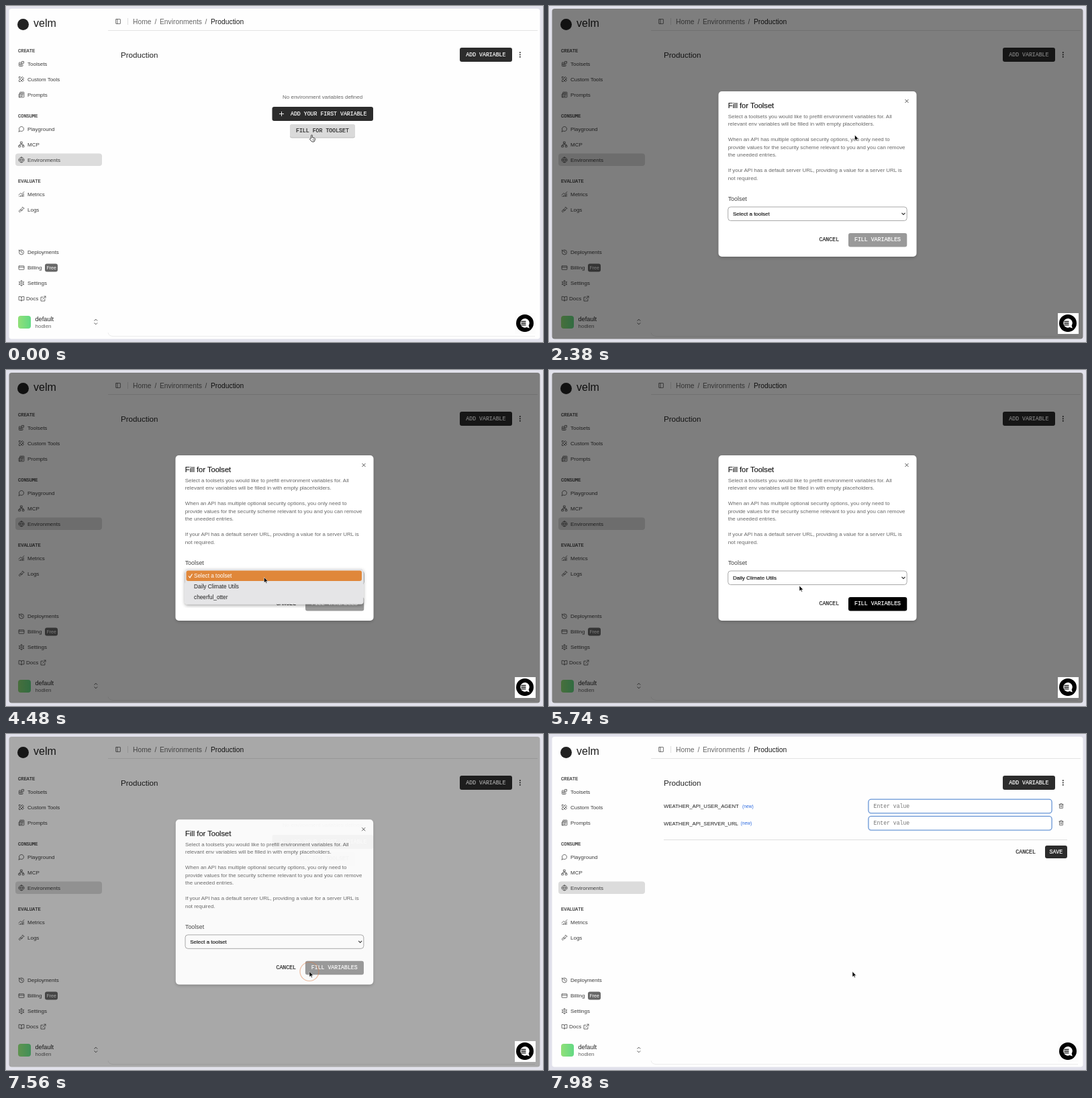
Write an HTML page that moves like this. It is 800 px wide and 500 px high and loops after 8 s.

```html
<!DOCTYPE html>
<html lang="en">
<head>
<meta charset="utf-8">
<title>Fill environment</title>
<style>
html, body { margin: 0; width: 100%; height: 100%; overflow: hidden; background: #e1e1eb; }
svg { display: block; width: 800px; height: 500px; }
text { font-family: "Liberation Sans", Arial, sans-serif; white-space: pre; }
.mono { font-family: "Liberation Mono", monospace; }
.medium { stroke: currentColor; stroke-width: .2px; }
.icon { fill: none; stroke: #484848; stroke-width: 2; stroke-linecap: round; stroke-linejoin: round; }
</style>
</head>
<body>
<svg id="stage" viewBox="0 0 800 500"></svg>
<script>
const ICONS = {
  blocks: 'M14 3h7v7h-7zM10 21V8a1 1 0 0 0-1-1H4a1 1 0 0 0-1 1v12a1 1 0 0 0 1 1h12a1 1 0 0 0 1-1v-5a1 1 0 0 0-1-1H3',
  tools: 'M3 3h5l4 4M15 10l6 6-5 5-6-6M8 13 3 8V3M16 3l5 5L8 21H3v-5z',
  news: 'M4 22h16a2 2 0 0 0 2-2V4a2 2 0 0 0-2-2H8a2 2 0 0 0-2 2v16a2 2 0 0 1-4 0v-9a2 2 0 0 1 2-2h2M18 14h-8M15 18h-5M10 6h8v4h-8z',
  chat: 'M7.9 20A9 9 0 1 0 4 16.1L2 22z',
  network: 'M16 16h6v6h-6zM2 16h6v6H2zM9 2h6v6H9zM5 16v-4h14v4M12 12V8',
  globe: 'M12 2a10 10 0 1 0 .01 0M12 2a14.5 14.5 0 0 0 0 20 14.5 14.5 0 0 0 0-20M2 12h20',
  chart: 'M12 16v5M16 14v7M20 10v11M8 18v3M4 20v1M22 3l-9 9-4-4-7 7',
  tube: 'M21 7 7 21a3 3 0 0 1-4-4L17 3M16 2l6 6M7 14h9',
  history: 'M3 12a9 9 0 1 0 9-9 9.7 9.7 0 0 0-7 2.7L3 8M3 3v5h5M12 7v5l4 2',
  card: 'M3 5h18a1 1 0 0 1 1 1v12a1 1 0 0 1-1 1H3a1 1 0 0 1-1-1V6a1 1 0 0 1 1-1M2 10h20',
  gear: 'M12 9a3 3 0 1 0 .01 0M12 4a8 8 0 1 0 .01 0M12 1v3M12 20v3M2.5 6.5l2.6 1.5M18.9 16l2.6 1.5M2.5 17.5l2.6-1.5M18.9 8l2.6-1.5',
  book: 'M12 7v14M3 18a1 1 0 0 1-1-1V4h5a5 4 0 0 1 5 4 5 4 0 0 1 5-4h5v14h-7a3 3 0 0 0-3 3 3 3 0 0 0-3-3z',
  link: 'M15 3h6v6M10 14 21 3M18 13v8H3V6h8',
  trash: 'M3 6h18M19 6v14a2 2 0 0 1-2 2H7a2 2 0 0 1-2-2V6M8 6V4a2 2 0 0 1 2-2h4a2 2 0 0 1 2 2v2M10 11v6M14 11v6',
  panel: 'M4 3h16a1 1 0 0 1 1 1v16a1 1 0 0 1-1 1H4a1 1 0 0 1-1-1V4a1 1 0 0 1 1-1M9 3v18'
};

// Markup helpers; text is placed by its left edge and baseline.
const text = (x, y, str, size = 8, fill = '#3c3c3c', attrs = '') =>
  `<text x="${x}" y="${y}" font-size="${size}" fill="${fill}" color="${fill}" ${attrs}>${str}</text>`;
const mono = (x, y, str, fill = '#222', size = 8.22, attrs = '') =>
  text(x, y, str, size, fill, `class="mono medium" ${attrs}`);
const rect = (x, y, w, h, fill, r = 0, attrs = '') =>
  `<rect x="${x}" y="${y}" width="${w}" height="${h}" rx="${r}" fill="${fill}" ${attrs}/>`;
const line = (d, color, width = 1, attrs = '') =>
  `<path d="${d}" fill="none" stroke="${color}" stroke-width="${width}" ${attrs}/>`;
const icon = (name, cx, cy, size = 9.4) =>
  `<path class="icon" d="${ICONS[name]}" transform="translate(${cx - size / 2} ${cy - size / 2}) scale(${size / 24})"/>`;
const group = (id, body, attrs = '') => `<g id="${id}" ${attrs}>${body}</g>`;

const navItems = [
  ['blocks', 'Toolsets', 86], ['tools', 'Custom Tools', 109], ['news', 'Prompts', 132],
  ['chat', 'Playground', 183], ['network', 'MCP', 206], ['globe', 'Environments', 229],
  ['chart', 'Metrics', 280], ['tube', 'Logs', 303],
  ['history', 'Deployments', 366.5], ['card', 'Billing', 389.5], ['gear', 'Settings', 412.5]
];

const sidebar =
  '<circle cx="25.5" cy="27.5" r="8.5" fill="#222"/>' +
  text(41, 31, 'velm', 16, '#1c1c1c') +
  [['CREATE', 69], ['CONSUME', 166], ['EVALUATE', 263]]
    .map(([label, y]) => mono(18, y, label, '#333', 7)).join('') +
  rect(14, 219.5, 129, 18.5, '#dcdcdc', 4) +
  navItems.map(([name, label, y]) => icon(name, 23, y) + text(32, y + 2.7, label)).join('') +
  rect(58, 383.5, 19, 12, '#686868', 3) + text(60.5, 392.2, 'Free', 7, '#fff') +
  icon('book', 23, 435.5) + text(30, 438.4, 'Docs') + icon('link', 55.5, 435.5) +
  rect(18, 461, 19, 19, 'url(#avatar)', 4) +
  text(43.5, 469, 'default', 9.2, '#222') + text(43.5, 479, 'hodlen', 8, '#666') +
  line('M131.5 468.5l2.3-2.3 2.3 2.3M131.5 471.5l2.3 2.3 2.3-2.3', '#444', .9);

const header =
  line('M152 36.5H792', '#e4e4e4') + line('M152 486q1 5 7 5.5H788', '#ececec') +
  icon('panel', 167, 23, 9) + line('M181.5 18v10', '#dedede') +
  text(189, 26.6, 'Home', 10.3, '#666') + text(221.5, 26.6, '/', 10.3, '#666') +
  text(229, 26.6, 'Environments', 10.3, '#666') + text(296.5, 26.6, '/', 10.3, '#666') +
  text(305, 26.6, 'Production', 10.3, '#1c1c1c') +
  text(171, 76.8, 'Production', 11.6, '#222') +
  rect(676, 62, 78, 21, '#2c2c2c', 3) + mono(685.3, 75.2, 'ADD VARIABLE', '#fff') +
  [69.3, 72.5, 75.7].map(y => `<circle cx="765.8" cy="${y}" r=".95" fill="#222"/>`).join('');

const emptyState =
  text(412, 138, 'No environment variables defined', 8, '#666') +
  rect(396.5, 150, 150.5, 21, '#2c2c2c', 3) +
  line('M407 160.5h7M410.5 157v7', '#fff', .9) +
  mono(424, 163, 'ADD YOUR FIRST VARIABLE', '#fff') +
  rect(423, 176.5, 97, 20, '#bdbdbd', 3) +
  rect(423, 176, 97, 19.5, '#dadada', 3, 'id="fillButton"') +
  mono(432, 188.2, 'FILL FOR TOOLSET');

const variableRow = (label, newX, y) =>
  text(171, y + 3, label, 7.75, '#1c1c1c') +
  text(newX, y + 2.6, '(new)', 6.7, '#2d6be0') +
  rect(476, y - 10, 273, 20.5, '#fff', 4, 'stroke="#d4e1f5" stroke-width="2.4"') +
  rect(476, y - 10, 273, 20.5, '#fff', 4, 'stroke="#6190d2" stroke-width="1.1"') +
  text(483.5, y + 2.4, 'Enter value', 8.15, '#777', 'class="mono"') +
  icon('trash', 763, y - .2, 8.6);

const variables =
  variableRow('WEATHER_API_USER_AGENT', 288, 107.3) +
  variableRow('WEATHER_API_SERVER_URL', 285.5, 132.5) +
  line('M171 157.5H772', '#dedede') + mono(695.3, 178.3, 'CANCEL') +
  rect(739, 166, 33, 19, '#2c2c2c', 3) + mono(745.5, 178.3, 'SAVE', '#fff');

const paragraphs = [
  ['Select a toolsets you would like to prefill environment variables for. All', 166.5],
  ['relevant env variables will be filled in with empty placeholders.', 178],
  ['When an API has multiple optional security options, you only need to', 201.3],
  ['provide values for the security scheme relevant to you and you can remove', 212.8],
  ['the uneeded entries.', 224.3],
  ['If your API has a default server URL, providing a value for a server URL is', 247.3],
  ['not required.', 258.8]
];

const dialog =
  rect(252.5, 127, 295, 246, '#fff', 5, 'filter="url(#shadow)"') +
  text(266.7, 151.7, 'Fill for Toolset', 11.15, '#1c1c1c', 'class="medium"') +
  line('M530.5 139l5 5M535.5 139l-5 5', '#444', .9) +
  paragraphs.map(([str, y]) => text(266.7, y, str, 7.95, '#666')).join('') +
  text(266.7, 290, 'Toolset', 8.9, '#444') +
  rect(266.7, 299, 266.5, 20.5, '#fff', 4, 'stroke="#a0a0a0" stroke-width=".9"') +
  text(274, 312, '', 8, '#1c1c1c', 'id="chosen" class="medium"') +
  line('M525.5 308l2.5 2.5 2.5-2.5', '#333', 1.1) +
  mono(402.5, 350.4, 'CANCEL') +
  rect(446, 338, 87.3, 20.5, '#999', 3, 'id="submit"') +
  mono(455, 350.4, 'FILL VARIABLES', '#fff');

const options = ['Select a toolset', 'Daily Climate Utils', 'cheerful_otter'];
const menu =
  rect(266.5, 296, 266, 52.5, '#e5e5e7', 4, 'filter="url(#menuShadow)"') +
  rect(268.5, 298.5, 261.5, 15.5, '#e0873a', 3, 'id="highlight"') +
  line('M272 306.5l2 2.5 3.5-5.5', '#222', 1.2, 'id="check"') +
  options.map((label, i) => text(280, 309.2 + i * 15.8, label, 8.25, '#222', 'class="option"')).join('');

const chat =
  rect(758, 457, 31, 31, '#fff', 0, 'id="chatBack"') +
  '<circle cx="773" cy="472" r="13" fill="#000"/>' +
  '<path d="M773 465a6.8 6.8 0 1 0 2.6 13.1l4.2 1.4-1.2-4a6.8 6.8 0 0 0-5.6-10.500z" fill="#fff"/>' +
  line('M767.5 469.3h7M767.5 472h7M767.5 474.7h7', '#000', 1.3);

const pointer =
  group('arrow', '<path d="M0 0v8l1.9-1.7 1.3 2.8 1.2-.6-1.3-2.6h2.6z" fill="#000" stroke="#fff" stroke-width=".5"/>') +
  group('hand', '<path d="M-.9 5V.8a.9.9 0 0 1 1.8 0V3.8l3.2.8q1 .3.9 1.3l-.6 2.6-.9 1.5H.2L-2.8 6.6q-.6-1 .5-1.2z" fill="#fff" stroke="#222" stroke-width=".85"/>' +
    line('M1.5 6v2.5M3 6.2v2.3', '#222', .5));

document.getElementById('stage').innerHTML = `<defs>
  <linearGradient id="avatar"><stop stop-color="#91e078"/><stop offset="1" stop-color="#62d984"/></linearGradient>
  <filter id="shadow"><feDropShadow dx="0" dy="2" stdDeviation="2" flood-opacity=".18"/></filter>
  <filter id="menuShadow"><feDropShadow dx="0" dy="2" stdDeviation="2.5" flood-opacity=".35"/></filter>
  </defs>` +
  rect(0, 0, 800, 500, '#e1e1eb') + rect(4.5, 4, 791, 491.5, '#fefefe', 4) +
  sidebar + header + group('empty', emptyState) + group('variables', variables) +
  rect(4.5, 4, 791, 491.5, '#000', 4, 'id="overlay"') +
  group('dialog', dialog) + group('menu', menu) + chat +
  '<circle id="ring" fill="none" stroke="#dd7b42" stroke-width="1.2"/>' + group('pointer', pointer);

const $ = id => document.getElementById(id);
const set = (id, attrs) => { for (const key in attrs) $(id).setAttribute(key, attrs[key]); };
const show = (id, visible) => { $(id).style.display = visible ? '' : 'none'; };
const progress = (t, start, length) => Math.min(1, Math.max(0, (t - start) / length));
const easeOut = p => 1 - (1 - p) ** 2;
const easeInOut = p => p < .5 ? 4 * p ** 3 : 1 - (2 - 2 * p) ** 3 / 2;

const LOOP = 8000, STEP = 70;
const OPEN = 620, CLOSE = 7555, FADE = 200, OVERLAY_LEAD = 30;
const MENU_OPEN = 3500, MENU_CLOSE = 5530, PICKED = 5600, SAVED = 7840;
const clicks = [420, 3430, 5390, 7350];
const home = [455.5, 192];
const moves = [
  { start: 2380, length: 770, to: [384.5, 308.5] },
  { start: 4480, length: 280, to: [373, 321] },
  { start: 6300, length: 560, to: [452, 353.5] }
];

function pointerAt(t) {
  let [x, y] = home;
  for (const { start, length, to } of moves) {
    const p = easeInOut(progress(t, start, length));
    x += (to[0] - x) * p;
    y += (to[1] - y) * p;
  }
  return [x, y];
}

const openness = t => easeOut(progress(t, OPEN, FADE)) - easeOut(progress(t, CLOSE, FADE));

function draw(t) {
  const [x, y] = pointerAt(t);
  const closing = t >= CLOSE;
  const opened = openness(t), dimmed = openness(t + OVERLAY_LEAD);
  const scale = .95 + .05 * opened;

  show('empty', t < SAVED);
  show('variables', t >= SAVED);
  set('fillButton', { fill: t < OPEN ? '#dadada' : '#ebebeb' });
  set('overlay', { opacity: dimmed * .5 });
  set('chatBack', { opacity: .3 + .7 * opened, fill: opened ? '#fff' : '#f4f4f4' });

  show('dialog', opened > 0);
  set('dialog', { opacity: opened, transform: `translate(400 250) scale(${scale}) translate(-400 -250)` });
  const picked = t >= PICKED && !closing;
  $('chosen').textContent = options[picked ? 1 : 0];
  set('submit', { fill: picked ? '#000' : '#999' });

  const menuOpacity = t < MENU_OPEN ? 0 : 1 - progress(t, MENU_CLOSE, 140);
  const active = y > 314 ? 1 : 0;
  show('menu', menuOpacity > 0);
  set('menu', { opacity: menuOpacity });
  set('highlight', { y: 298.5 + active * 15.8 });
  set('check', { stroke: active ? '#222' : '#fff' });
  document.querySelectorAll('.option').forEach((el, i) => el.setAttribute('fill', i === active ? '#fff' : '#222'));

  const age = t - clicks.findLast(start => start <= t);
  show('ring', age < 350);
  if (age < 350) set('ring', { cx: x, cy: y, r: 8 + age / 35, opacity: 1 - age / 400 });

  const overButton = t < OPEN || (x > 446 && y > 338 && !closing);
  set('pointer', { transform: `translate(${x} ${y})` });
  show('hand', overButton);
  show('arrow', !overButton);
}

function tick() {
  const t = performance.now() % LOOP;
  draw(Math.floor(t / STEP) * STEP);
  requestAnimationFrame(tick);
}
tick();
</script>
</body>
</html>
```
